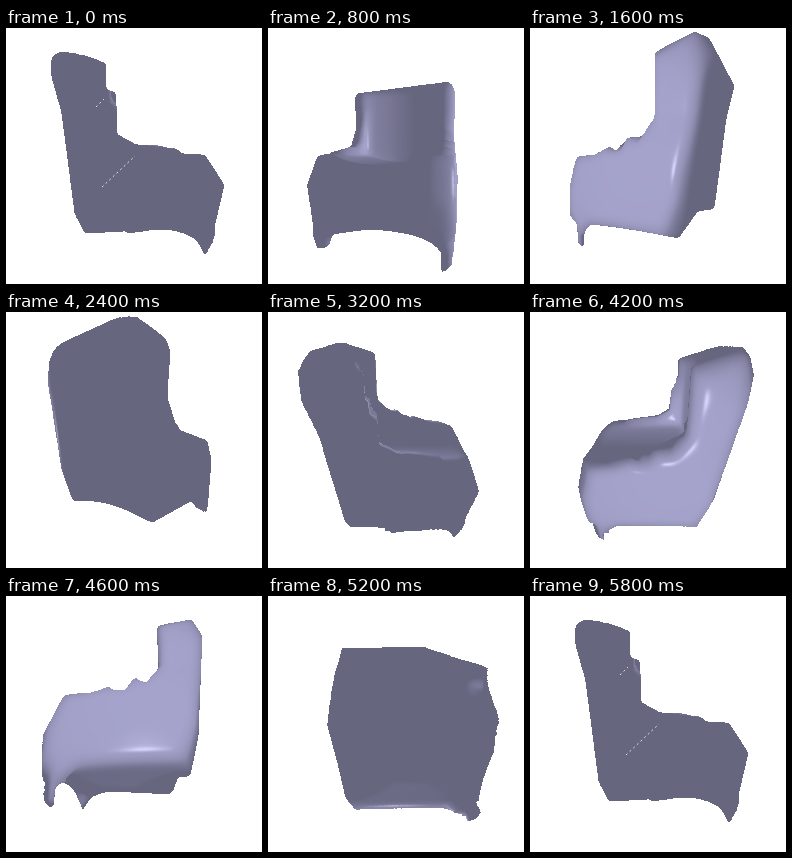
An HTML page with a canvas for the animation above (6000 ms loop, 256 by 256 pixels).

```html
<!DOCTYPE html>
<html lang="en">
<head>
<meta charset="utf-8">
<title>Turning armchair</title>
<style>
html, body { margin: 0; width: 100%; height: 100%; overflow: hidden; background: #fff; }
canvas { display: block; width: 100vw; height: 100vh; }
</style>
</head>
<body>
<canvas id="stage" width="256" height="256"></canvas>
<script>
const SIZE = 256, MID = SIZE / 2;
const LOOP = 6000, STEP = 200, HALF = 15;
const DIST = MID / Math.tan(Math.PI / 6); // 60 degree lens
const LIGHT_Z = -246, BASE = [206, 204, 254];
const CELL = 1.5, NX = 128, NY = 136, NZ = 92, LEVEL = 0.4;

const ctx = document.getElementById('stage').getContext('2d');
const solid = new Float32Array(NX * NY * NZ);
const frames = [];

const dot = (a, b) => a[0] * b[0] + a[1] * b[1] + a[2] * b[2];
const unit = v => {
  const len = Math.hypot(v[0], v[1], v[2]) || 1;
  return [v[0] / len, v[1] / len, v[2] / len];
};

// First half: one turn around the chair. Second half: one turn over and under it.
function camera(pose) {
  const angle = (pose % HALF) / (HALF - 1) * 2 * Math.PI;
  const c = Math.cos(angle), s = Math.sin(angle);
  if (pose < HALF) return { right: [c, 0, -s], up: [0, 1, 0], eye: [s, 0, c] };
  const flip = c < 0 ? -1 : 1; // the horizon stays level past the poles
  return { right: [flip, 0, 0], up: [0, c * flip, -s * flip], eye: [0, s, c] };
}

function eachCell(change) {
  let at = 0;
  for (let k = 0; k < NZ; k++)
    for (let j = 0; j < NY; j++)
      for (let i = 0; i < NX; i++, at++)
        change(at, (i - NX / 2) * CELL, (j - NY / 2) * CELL, (k - NZ / 2) * CELL);
}

// A block with a rounded hollow between the arms.
function block() {
  eachCell((at, x, y, z) => {
    const bowl = (z / 14) ** 2;
    const gap = Math.max(bowl - 7 - y, bowl - 34 - x, Math.abs(z) - 40);
    solid[at] = Math.min(1, Math.max(0, 0.5 + gap * 0.25));
  });
}

// Cut away all that lies outside an outline seen from the given pose.
function carve(pose, outline) {
  const wide = SIZE * 2;
  const mask = document.createElement('canvas');
  mask.width = mask.height = wide;
  const pen = mask.getContext('2d');
  const path = new Path2D(outline + 'z');
  pen.filter = 'blur(2.5px)';
  pen.scale(2, 2);
  pen.lineWidth = 1.5;
  pen.miterLimit = 4;
  pen.fill(path);
  pen.stroke(path);
  const alpha = pen.getImageData(0, 0, wide, wide).data;
  const { right: r, up: u, eye: e } = camera(pose);
  eachCell((at, x, y, z) => {
    if (!solid[at]) return;
    const scale = DIST / (DIST - (x * e[0] + y * e[1] + z * e[2]));
    const px = (MID + scale * (x * r[0] + y * r[1] + z * r[2])) * 2 | 0;
    const py = (MID - scale * (x * u[0] + y * u[1] + z * u[2])) * 2 | 0;
    const inside = px >= 0 && py >= 0 && px < wide && py < wide;
    const cover = inside ? alpha[(py * wide + px) * 4 + 3] / 255 : 0;
    if (cover < solid[at]) solid[at] = cover;
  });
}

function blurAlong(grid, stride) {
  const out = new Float32Array(grid.length), reach = 3 * stride;
  for (let at = reach; at < grid.length - reach; at++) {
    let sum = 0;
    for (let d = -reach; d <= reach; d += stride) sum += grid[at + d];
    out[at] = sum / 7;
  }
  return out;
}

const blur = grid => [1, NX, NX * NY].reduce(blurAlong, grid);

// Smoothly interpolated value of a grid.
function sample(grid, x, y, z) {
  const gx = x / CELL + NX / 2, gy = y / CELL + NY / 2, gz = z / CELL + NZ / 2;
  const i = Math.floor(gx), j = Math.floor(gy), k = Math.floor(gz);
  if (i < 0 || j < 0 || k < 0 || i >= NX - 1 || j >= NY - 1 || k >= NZ - 1) return 0;
  const fx = gx - i, fy = gy - j, fz = gz - k;
  const row = at => grid[at] + (grid[at + 1] - grid[at]) * fx;
  const layer = at => {
    const a = row(at);
    return a + (row(at + NX) - a) * fy;
  };
  const at = (k * NY + j) * NX + i, near = layer(at);
  return near + (layer(at + NX * NY) - near) * fz;
}

function nearest(x, y, z) {
  const i = Math.round(x / CELL + NX / 2);
  const j = Math.round(y / CELL + NY / 2);
  const k = Math.round(z / CELL + NZ / 2);
  if (i < 0 || j < 0 || k < 0 || i >= NX || j >= NY || k >= NZ) return 0;
  return solid[(k * NY + j) * NX + i];
}

function shade(p, from) {
  const [x, y, z] = p, h = CELL;
  const normal = unit([
    sample(soft, x - h, y, z) - sample(soft, x + h, y, z),
    sample(soft, x, y - h, z) - sample(soft, x, y + h, z),
    sample(soft, x, y, z - h) - sample(soft, x, y, z + h)
  ]);
  const light = unit([-x, -y, LIGHT_Z - z]);
  const facing = Math.max(0, dot(normal, light));
  let shine = 0;
  if (facing > 0) {
    const view = unit(from.map((v, i) => v - p[i]));
    const bounce = normal.map((v, i) => 2 * facing * v - light[i]);
    shine = 51 * Math.max(0, dot(bounce, view)) ** 64;
  }
  return BASE.map(v => v * (0.5 + 0.3 * facing) + shine);
}

// Distance along a ray to the surface, or 0 for a miss.
function trace(from, dir) {
  const [ox, oy, oz] = from, [dx, dy, dz] = dir, step = 0.008;
  const hit = t => sample(solid, ox + dx * t, oy + dy * t, oz + dz * t) > LEVEL;
  for (let t = 0.45; t < 1.55; t += step) {
    if (nearest(ox + dx * t, oy + dy * t, oz + dz * t) < 0.03 || !hit(t)) continue;
    let low = t - step, high = t;
    for (let n = 0; n < 5; n++) {
      const half = (low + high) / 2;
      if (hit(half)) high = half; else low = half;
    }
    return high;
  }
  return 0;
}

function render(pose) {
  const image = ctx.createImageData(SIZE, SIZE);
  const { right, up, eye } = camera(pose);
  const from = eye.map(v => v * DIST);
  image.data.fill(255);
  for (let py = 0, at = 0; py < SIZE; py++) {
    for (let px = 0; px < SIZE; px++, at += 4) {
      const sx = px + 0.5 - MID, sy = MID - py - 0.5;
      const dir = [0, 1, 2].map(i => right[i] * sx + up[i] * sy - from[i]);
      const t = trace(from, dir);
      if (t) image.data.set(shade(from.map((v, i) => v + dir[i] * t), from), at);
    }
  }
  return image;
}

const frame = pose => frames[pose] ??= render(pose);

// Fine open seams, seen only straight from the side.
function seams() {
  ctx.strokeStyle = '#fff';
  ctx.lineWidth = 0.8;
  ctx.setLineDash([2, 3]);
  ctx.stroke(new Path2D('M96 159L129 128M90 79L98 71'));
}

block();
// side
carve(0, 'M46 45L47 28 61 23 99 32 99 62 109 66 110 107 130 118 166 118 176 127 198 128 217 157 208 195 207 218 199 228Q195 200 150 200L117 205 80 205 70 185 57 85');
// front
carve(4, 'M88 67L181 55 187 66 184 104 190 165 183 236 174 244 175 226Q165 203 100 200L64 205 59 219 50 221 45 214 39 160 49 130 84 120 90 100');
// other side
carve(8, 'M126 24L165 5 178 11 203 58 195 90 183 180 167 182 148 209Q95 198 60 195L54 202 54 216 50 218 48 195 41 187 41 148 48 130 65 128 80 120 86 125 98 111 112 110 126 90');
// back
carve(12, 'M45 42L52 34 115 5 130 6 158 26 164 41 160 78 172 119 200 129 204 148 200 199 195 201 186 187 145 210Q105 184 68 188L57 158 43 72');
// top
carve(19, 'M158 41L172 33 212 32 221 60 231 150 226 186Q190 197 160 187L70 183 63 176 63 145 69 88 78 79 134 79 152 68');
// from below
carve(23, 'M152 30L185 25 195 40 191 140 183 179 171 180 165 197 105 194Q80 197 78 213L70 195Q57 178 48 192L46 212 37 202 38 140 60 98 100 91 108 96 120 95 129 83 140 89 154 72');
const soft = blur(blur(solid));

let start, shown = -1;
function tick(now) {
  start ??= now;
  const pose = Math.floor((now - start) % LOOP / STEP);
  if (pose !== shown) {
    ctx.putImageData(frame(pose), 0, 0);
    if (pose % HALF % (HALF - 1) === 0) seams();
    shown = pose;
  } else {
    frame((pose + 1) % (LOOP / STEP)); // ready ahead of time
  }
  requestAnimationFrame(tick);
}
frame(0);
requestAnimationFrame(tick);
</script>
</body>
</html>
```
